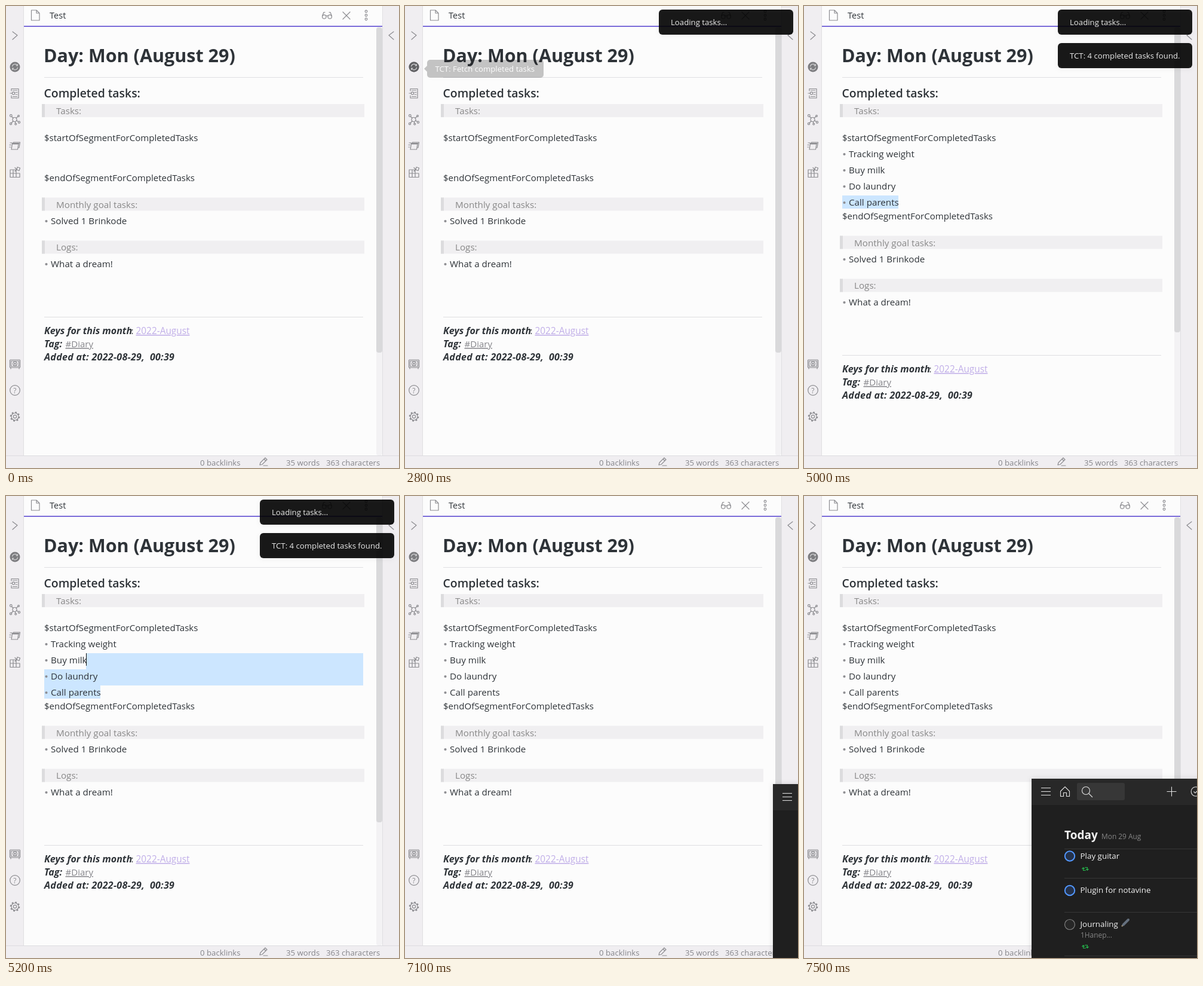
An HTML page that plays this animation: 658x773 px, repeating every 8 s.

```html
<!DOCTYPE html>
<html lang="en">
<head>
<meta charset="utf-8">
<title>Daily note</title>
<style>
  html, body { margin: 0; width: 100%; height: 100%; overflow: hidden; background: #fcfcfc; }
  svg { display: block; }
  text { font: 15.2px "Open Sans", "Noto Sans", sans-serif; fill: #2e3338; white-space: pre; }
  .h1 { font-size: 30.5px; font-weight: 700; }
  .h2 { font-size: 19.4px; font-weight: 600; }
  .tab { font-size: 14.6px; font-weight: 500; }
  .code { font-size: 15.05px; }
  .quote { fill: #888; }
  .key { font-size: 16px; font-weight: 700; font-style: italic; }
  .wide { letter-spacing: .3px; }
  .link { font-size: 15.4px; fill: #c0aee8; text-decoration: underline; }
  .tag { font-size: 15px; fill: #85858a; text-decoration: underline; }
  .status { font-size: 13.2px; fill: #85858a; }
  .light { font-size: 13.2px; fill: #e8e8e8; }
  .icons { fill: none; stroke: #8c8c90; stroke-width: 1.2; stroke-linecap: round; stroke-linejoin: round; }
  .icons text { font-size: 12px; fill: #8c8c90; stroke: none; }
  .solid { fill: #8c8c90; }
  .box { filter: drop-shadow(0 2px 4px rgba(0, 0, 0, .05)); }
  .caret { fill: #111; }
  .dark { filter: drop-shadow(0 0 5px rgba(0, 0, 0, .12)); }
  .dark text { font-size: 13.4px; fill: #f2f2f2; }
  .dark .today { font-size: 19px; font-weight: 700; }
  .dark .small { font-size: 11.9px; fill: #858585; }
  .dark .pale { fill: none; stroke: #e2e2e2; stroke-width: 1.1; }

  /* One loop is 8 s, so 1.25% is one tenth of a second. */
  .anim { animation: 8s step-end infinite; opacity: 0; }
  .fold { animation-name: fold; }
  .caret1 { animation-name: caret1; }
  .caret2 { animation-name: caret2; }
  .caret3 { animation-name: caret3; }
  .tip { animation-name: tip; }
  .hover { animation-name: hover; }
  .note1 { animation-name: note1; }
  .note2 { animation-name: note2; }
  .added { animation-name: added; }
  .sel1 { animation-name: sel1; }
  .sel2 { animation-name: sel2; }
  .sel3 { animation-name: sel3; }
  .win { animation-name: win; }
  .below { animation: below 8s step-end infinite; }
  .thumb { animation: thumb 8s step-end infinite; height: 544px; }

  @keyframes fold {
    0% { opacity: 0 } 7.5% { opacity: .5 } 8.75% { opacity: 1 } 22.5% { opacity: .5 }
    23.75% { opacity: 0 } 48.75% { opacity: .5 } 51.25% { opacity: 0 }
  }
  @keyframes caret1 { 0% { opacity: 0 } 16.25% { opacity: 1 } 22.5% { opacity: 0 } 28.75% { opacity: 1 } 35% { opacity: 0 } }
  @keyframes caret2 { 0% { opacity: 0 } 65% { opacity: 1 } 72.5% { opacity: 0 } }
  @keyframes caret3 { 0% { opacity: 0 } 73.75% { opacity: 1 } 80% { opacity: 0 } 86.25% { opacity: 1 } 87.5% { opacity: 0 } }
  @keyframes tip {
    0% { opacity: 0 } 26.25% { opacity: .28 } 27.5% { opacity: .75 } 28.75% { opacity: 1 }
    33.75% { opacity: .7 } 35% { opacity: .25 } 36.25% { opacity: 0 }
  }
  @keyframes hover { 0% { opacity: 0 } 26.25% { opacity: .6 } 27.5% { opacity: 1 } 48.75% { opacity: .5 } 50% { opacity: .2 } 51.25% { opacity: 0 } }
  @keyframes note1 { 0% { opacity: 0 } 33.75% { opacity: .5 } 35% { opacity: 1 } 80% { opacity: 0 } }
  @keyframes note2 {
    0% { opacity: 0 } 40% { opacity: .5 } 41.25% { opacity: 1 }
    80% { opacity: 1; transform: translateY(-56px) }
    86.25% { opacity: .5; transform: translateY(-56px) }
    87.5% { opacity: 0 }
  }
  @keyframes added { 0% { opacity: 0 } 40% { opacity: 1 } }
  @keyframes below { 0% { transform: none } 40% { transform: translateY(64px) } }
  @keyframes thumb { 0% { height: 544px } 40% { height: 510px } }
  @keyframes sel1 { 0% { opacity: 0 } 62.5% { opacity: 1 } 72.5% { opacity: 0 } }
  @keyframes sel2 { 0% { opacity: 0 } 63.75% { opacity: 1 } 72.5% { opacity: 0 } }
  @keyframes sel3 { 0% { opacity: 0 } 65% { opacity: 1 } 72.5% { opacity: 0 } }
  @keyframes win {
    0% { opacity: 0 }
    88.75% { opacity: 1; transform: translate(235px, 9px) }
    90% { opacity: 1; transform: translate(164px, 7px) }
    91.25% { opacity: 1; transform: translate(89px, 4px) }
    92.5% { opacity: 1; transform: translate(29px, 1px) }
    93.75% { opacity: 1; transform: none }
  }
</style>
</head>
<body>
<svg width="658" height="773" viewBox="0 0 658 773">
  <defs>
    <g id="quote">
      <rect x="60" width="540" height="22" fill="#f0eff1"/>
      <rect x="60" width="5" height="22" fill="#dcdcde"/>
    </g>
    <circle id="dot" cx="67.5" r="2.1" fill="#8e8e92"/>
    <path id="sync" fill="none" stroke-width="1.3"
      d="M-4 -2V3H1M-6.500 0 -4-2.500 -1.500 0M4 2V-3H-1M6.500 0 4 2.500 1.500 0"/>
    <path id="swirl" fill="none" stroke="#c9c9cb" stroke-width="1.3"
      d="M-4.600-.600A4.700 4.700 0 0 1 4-2.600M4.600 .600A4.700 4.700 0 0 1 -4 2.600M4.400-5V-2.200H1.600M-4.400 5V2.200H-1.600"/>
  </defs>

  <!-- page frame -->
  <rect width="658" height="773" fill="#fcfcfc"/>
  <rect width="30" height="752" fill="#f0eef1"/>
  <rect x="29" width="1" height="752" fill="#e0dfe2"/>
  <rect x="630" width="28" height="752" fill="#f0eef1"/>
  <rect x="630" width="1" height="752" fill="#e0dfe2"/>
  <rect x="30" y="33" width="600" height="2" fill="#7b6cd9"/>
  <rect x="620" y="35" width="10" height="717" rx="4" fill="#f3f2f4"/>
  <rect class="thumb" x="620" y="36" width="10" rx="4" fill="#d9d9db"/>
  <rect y="752" width="658" height="21" fill="#f0eef1"/>
  <rect y="752" width="658" height="1" fill="#dddce0"/>

  <g class="icons">
    <path d="M11 43 19 49 11 56M649 43 641 49 649 56"/>
    <path d="M42.500 7H51L56 12V24H42.500ZM51 7V12H56"/>
    <path d="M529.500 17 532 10.500H534M545.500 17 543 10.500H541M536 17Q537.500 15 539 17"/>
    <circle cx="532.800" cy="18" r="3.200"/><circle cx="542.200" cy="18" r="3.200"/>
    <path d="M564 10 576 22M576 10 564 22"/>
    <circle cx="603" cy="9" r="1.800"/><circle cx="603" cy="15.500" r="1.800"/><circle cx="603" cy="22" r="1.800"/>

    <path d="M9 142V138.500H21V154H9V150M11.500 141H18.500M16 144.500H19M16 148H19M11.500 151.500H18.500M7 146H10"/>
    <circle cx="12.500" cy="146" r="2.200"/>
    <circle cx="14.500" cy="190" r="3.500"/>
    <path d="M12 187.500 9.500 185M17 187.500 20 185M12 192.500 9 196M17.500 191.500 20.500 193.500M15 193.500 16 196"/>
    <circle cx="8.300" cy="183.500" r="1.800"/><circle cx="21" cy="184" r="1.400"/><circle cx="8" cy="197" r="1.600"/>
    <circle cx="22" cy="194.500" r="1.600"/><circle cx="16.200" cy="197.600" r="1.400"/>
    <path d="M10.500 231H21L19.500 240H9ZM12.500 231V228H23.500L22 237H20M7 229H10.500M6 232.500H8.500M6 236H8"/>
    <path d="M10.500 230H21.500" stroke-width="2"/>
    <path d="M7 274H17V286.500H7ZM7 280H23V286.500H12V274M17 280V286.500M15 270.500 18 273.500 15 276.500M19 269.500 23.500 271 22 275.500 18 274Z"/>

    <rect x="6.500" y="592" width="17" height="13" rx="1"/><rect x="8.500" y="594" width="13" height="9"/>
    <circle cx="15" cy="598.500" r="3.400"/><circle class="solid" cx="15" cy="598.500" r="1"/><path d="M8 605V607M22 605V607"/>
    <circle cx="15" cy="643" r="8.300"/>
    <text x="12.300" y="647.500">?</text>
    <circle cx="15" cy="687" r="2.600"/>
    <circle cx="15" cy="687" r="6"/>
    <circle cx="15" cy="687" r="7.300" stroke-width="2" stroke-dasharray="2.700 3.030" stroke-linecap="butt"/>

    <path d="M425 768 426 764 434 756 437 759 429 767ZM432 758 435 761M431 769H438"/>
  </g>
  <circle cx="15" cy="102" r="8.500" fill="#7c7c7f"/>
  <use href="#swirl" x="15" y="102"/>
  <g class="anim hover">
    <circle cx="15" cy="102" r="8.500" fill="#606063"/>
    <use href="#swirl" x="15" y="102"/>
  </g>

  <text class="tab" x="73" y="21">Test</text>
  <text class="status" x="325" y="769">0 backlinks</text>
  <text class="status" x="469" y="769">35 words</text>
  <text class="status" x="536" y="769">363 characters</text>

  <!-- note -->
  <text class="h1" x="63" y="94">Day: Mon (August 29)</text>
  <rect x="64" y="119" width="534" height="1" fill="#e0e0e2"/>
  <path class="anim fold" d="M51 143H59L55 149Z" fill="#a0a0a4"/>
  <text class="h2" x="63.500" y="153">Completed tasks:</text>
  <use href="#quote" y="164"/>
  <text class="quote" x="84" y="181">Tasks:</text>

  <g fill="#cce6ff">
    <rect class="anim sel1" x="64" y="317" width="94" height="22"/>
    <rect class="anim sel2" x="64" y="290" width="534" height="27"/>
    <rect class="anim sel3" x="134" y="263" width="464" height="27"/>
  </g>
  <text class="code" x="64" y="226">$startOfSegmentForCompletedTasks</text>
  <g class="anim added">
    <use href="#dot" y="248"/><text x="75" y="253">Tracking weight</text>
    <use href="#dot" y="275"/><text x="75" y="280">Buy milk</text>
    <use href="#dot" y="302"/><text x="75" y="307">Do laundry</text>
    <use href="#dot" y="329"/><text x="75" y="334">Call parents</text>
  </g>
  <rect class="anim caret caret1" x="64" y="231" width="1" height="21"/>
  <rect class="anim caret caret2" x="134" y="263" width="1" height="21"/>
  <rect class="anim caret caret3" x="157" y="317" width="1" height="21"/>

  <g class="below">
    <text class="code" x="64" y="293">$endOfSegmentForCompletedTasks</text>
    <use href="#quote" y="320.500"/>
    <text class="quote" x="84" y="338">Monthly goal tasks:</text>
    <use href="#dot" y="360"/><text x="75" y="365">Solved 1 Brinkode</text>
    <use href="#quote" y="392.500"/>
    <text class="quote" x="84" y="409">Logs:</text>
    <use href="#dot" y="432"/><text x="75" y="437">What a dream!</text>
    <rect x="64" y="520" width="534" height="1" fill="#dfdfe1"/>
    <text class="key" x="64" y="549">Keys for this month</text>
    <text x="209.500" y="549">:</text>
    <text class="link" x="217.500" y="549">2022-August</text>
    <text class="key" x="64" y="571">Tag:</text>
    <text class="tag" x="99.500" y="571">#Diary</text>
    <text class="key wide" x="64" y="593">Added at: 2022-08-29,  00:39</text>
  </g>

  <!-- tooltip and notices -->
  <g class="anim tip">
    <g class="box">
      <rect x="37" y="90" width="195" height="30" rx="5" fill="#1a1a1a"/>
      <path d="M32 105 37 100V110Z" fill="#1a1a1a"/>
    </g>
    <text class="light" x="50.500" y="110" style="fill:#fff">TCT: Fetch completed tasks</text>
  </g>
  <g class="anim note1">
    <rect class="box" x="425" y="6" width="225" height="42" rx="6" fill="#000" fill-opacity=".9"/>
    <text class="light" x="445" y="32">Loading tasks...</text>
  </g>
  <g class="anim note2">
    <rect class="box" x="425" y="62" width="225" height="42" rx="6" fill="#000" fill-opacity=".9"/>
    <text class="light" x="445" y="88">TCT: 4 completed tasks found.</text>
  </g>

  <!-- task window -->
  <g class="anim win">
    <g class="dark">
      <rect x="381" y="473" width="420" height="330" fill="#1f1f1f"/>
      <rect x="381" y="473" width="420" height="44" fill="#282828"/>
      <rect x="457" y="480" width="80" height="29" rx="3" fill="#373737"/>
      <g class="pale">
        <path d="M397 488.500H413M397 494.500H413M397 500.500H413"/>
        <path d="M429.500 494 437 486.500 444.500 494V502.500H439.500V496.500H434.500V502.500H429.500Z"/>
        <circle cx="472" cy="493" r="6.500"/><path d="M477 498 483 504"/>
        <path d="M607.500 494.500H623.500M615.500 486.500V502.500"/>
        <circle cx="656" cy="494.500" r="7.800"/><path d="M652.500 494.500 655 497 660 492"/>
      </g>
      <text class="today" x="436" y="574">Today</text>
      <text class="small" x="498" y="574">Mon 29 Aug</text>
      <path d="M436 590.500H800M436 639.500H800M436 696.500H800M436 769.500H800" stroke="#363636"/>
      <g fill="#25324a" stroke="#5297ff" stroke-width="2">
        <circle cx="445" cy="602.500" r="8.200"/>
        <circle cx="445" cy="660" r="8.200"/>
      </g>
      <circle cx="445" cy="717" r="8.500" fill="#272727" stroke="#808080" stroke-width="1.200"/>
      <text x="462.500" y="607">Play guitar</text>
      <text x="462.500" y="664">Plugin for notavine</text>
      <text x="462.500" y="721">Journaling</text>
      <path d="M532 720 535 717" stroke="#b9a27a" stroke-width="2"/>
      <path d="M534.500 717.500 543 709" stroke="#65707e" stroke-width="4" stroke-linecap="round"/>
      <text class="small" x="463" y="739">1Hanep...</text>
      <g stroke="#25b84c">
        <use href="#sync" transform="translate(471 624) scale(.85)"/>
        <use href="#sync" transform="translate(471 754) scale(.85)"/>
      </g>
    </g>
  </g>
</svg>
</body>
</html>
```
